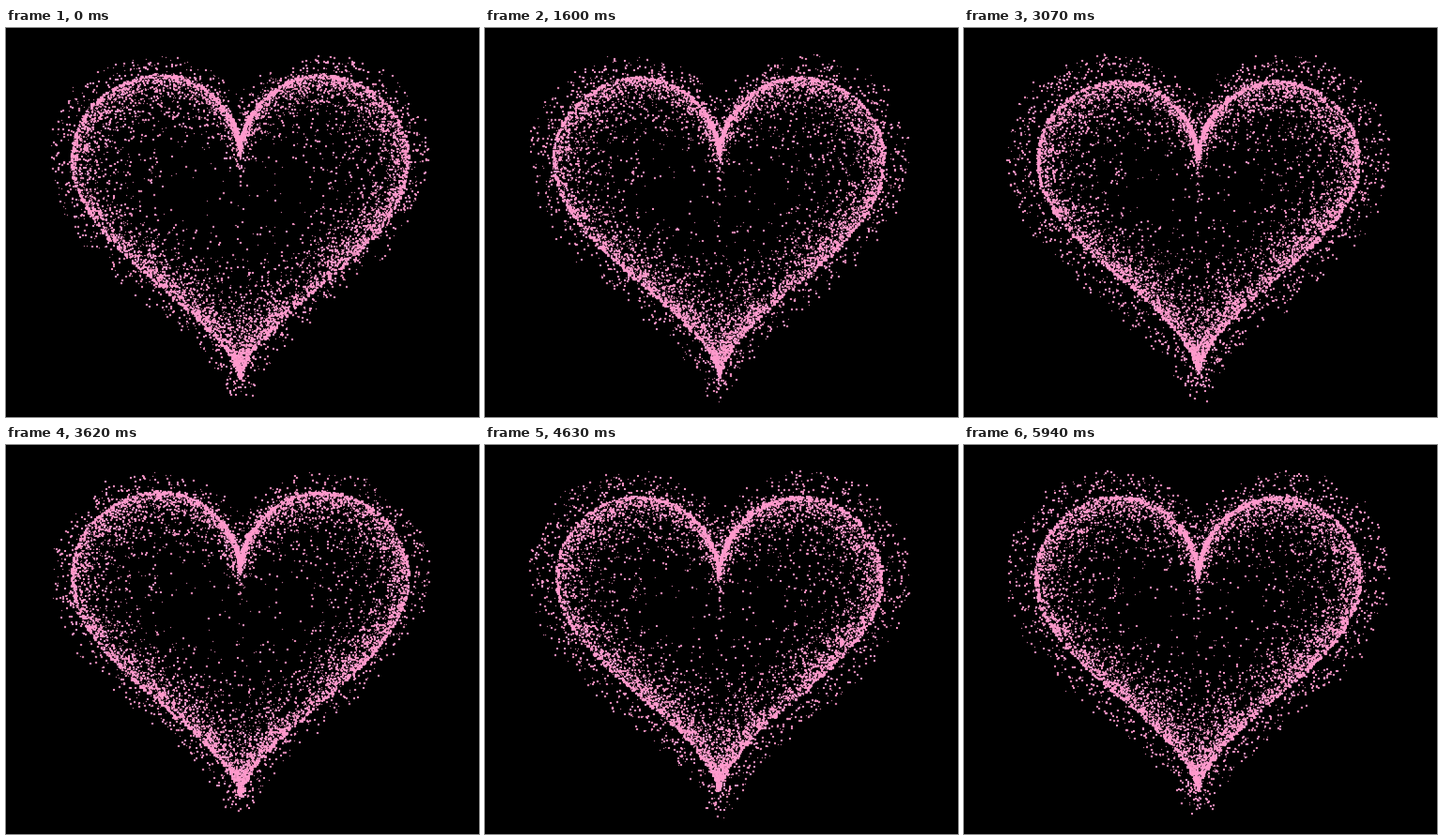
An HTML page with a canvas that plays this animation: 756 px wide and 622 px high, repeating every 6.03 s.

```html
<!DOCTYPE html>
<html>
<head>
<meta charset="utf-8">
<title>Beating heart</title>
<style>
html, body { margin: 0; height: 100%; overflow: hidden; background: #000; }
canvas { display: block; }
</style>
</head>
<body>
<canvas id="stage" width="756" height="622"></canvas>
<script>
const ctx = document.getElementById('stage').getContext('2d');
const LOOP = 6030, SCALE = 1.5, CX = 249, CY = 184;
const BEATS = [0, 70, 360, 680, 910, 1140, 1370, 1600, 1830, 2060, 2380, 2610, 2840, 3070,
  3390, 3620, 3920, 4150, 4400, 4630, 4930, 5160, 5390, 5710, 5940];

let seed = 1;
function rand() {
  seed = (seed + 0x6D2B79F5) | 0;
  let v = Math.imul(seed ^ (seed >>> 15), seed | 1);
  v ^= v + Math.imul(v ^ (v >>> 7), v | 61);
  return ((v ^ (v >>> 14)) >>> 0) / 4294967296;
}
const randInt = (lo, hi) => lo + Math.floor(rand() * (hi - lo + 1));

// Distinct whole-pixel points on the heart curve, relative to its centre
function outline(count, size) {
  const found = new Map();
  for (let i = 0; i < count; i++) {
    const t = rand() * 2 * Math.PI;
    const x = Math.floor(size * 16 * Math.sin(t) ** 3);
    const y = Math.floor(-size * (13 * Math.cos(t) - 5 * Math.cos(2 * t)
      - 2 * Math.cos(3 * t) - Math.cos(4 * t)));
    found.set(x * 1000 + y, [x, y]);
  }
  return [...found.values()];
}

const inward = ([x, y], beta) =>
  [x * (1 + beta * Math.log(1 - rand())), y * (1 + beta * Math.log(1 - rand()))];

// Moves a point away from the centre (towards it if amount is negative)
function push([x, y], amount, power) {
  const k = 1 + amount / Math.max(1, x * x + y * y) ** power;
  return [x * k, y * k];
}

function dot([x, y], jitter, size) {
  ctx.fillRect(Math.round(CX + x + randInt(-jitter, jitter)),
    Math.round(CY + y + randInt(-jitter, jitter)), size, size);
}

const line = outline(2000, 11);
const edge = line.flatMap(p => [0, 0, 0].map(() => inward(p, 0.05)));
const inner = Array.from({ length: 4000 }, () =>
  inward(line[randInt(0, line.length - 1)], 0.17));

function draw(step) {
  seed = 1000 + step * 7919;
  const pulse = 2 / Math.PI * Math.sin(0.4 * Math.PI * step);
  ctx.setTransform(1, 0, 0, 1, 0, 0);
  ctx.fillStyle = '#000';
  ctx.fillRect(0, 0, 756, 622);
  ctx.setTransform(SCALE, 0, 0, SCALE, 0, 0);
  ctx.fillStyle = '#ff99cc';

  const halo = Math.floor(10 + 6 * pulse);
  for (const p of outline(Math.floor(3000 + 4000 * pulse * pulse), 11.6))
    dot(push(p, halo, 0.6), 14, Math.min(2, randInt(1, 3)));
  for (const p of line) dot(push(p, -10 * pulse, 0.52), 1, randInt(1, 3));
  for (const p of edge) dot(push(p, -10 * pulse, 0.52), 1, randInt(1, 2));
  for (const p of inner) dot(push(p, -10 * pulse, 0.52), 1, randInt(1, 2));
}

let shown = -1;
function tick() {
  const now = performance.now() % LOOP;
  const beat = BEATS.findLastIndex(t => t <= now);
  if (beat !== shown) {
    shown = beat;
    draw((beat + 3) % 20);
  }
  requestAnimationFrame(tick);
}
tick();
</script>
</body>
</html>
```
